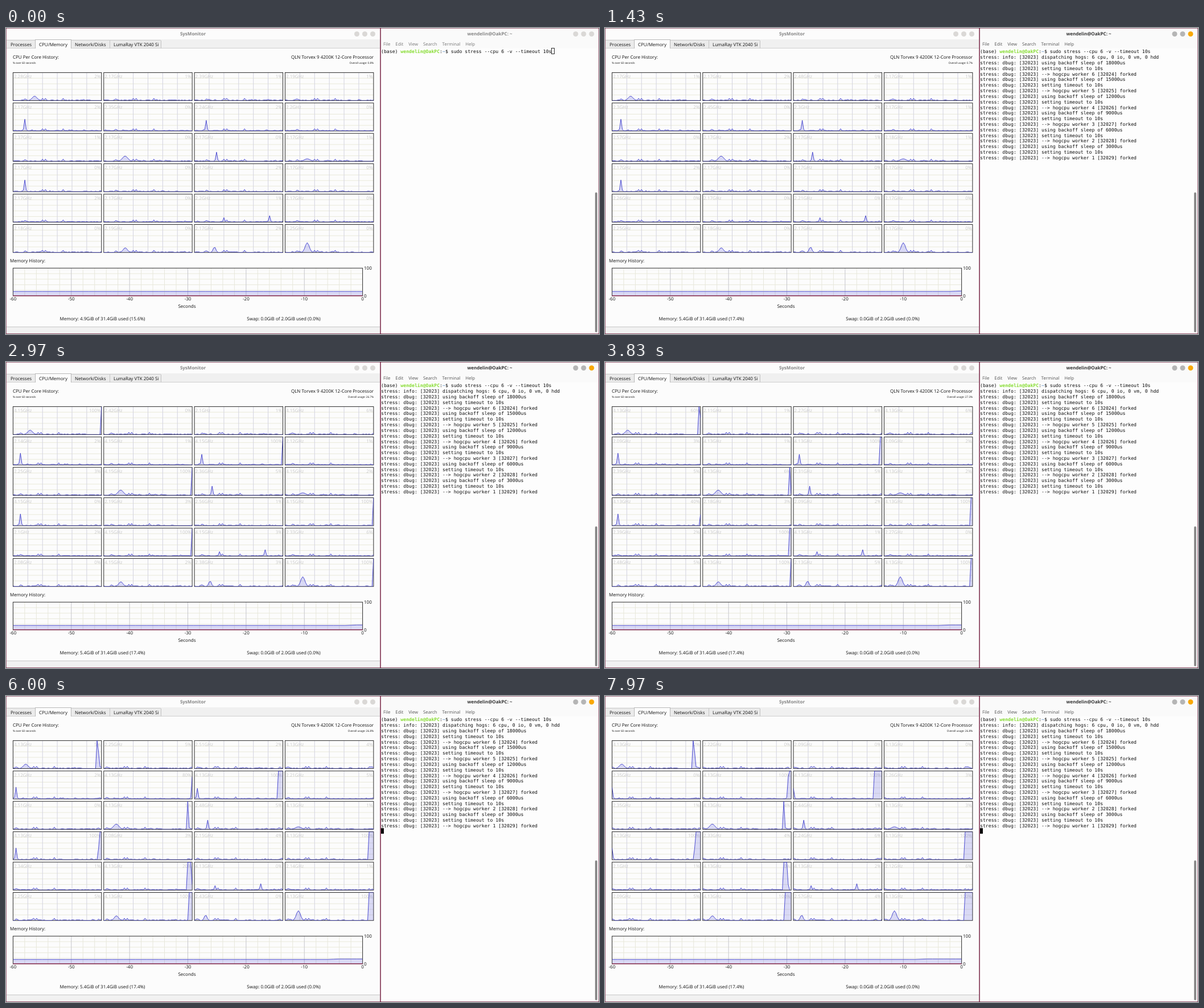
An HTML page with a canvas that plays this animation: 1042 by 538 pixels, repeating every 8 s.

```html
<!DOCTYPE html>
<html lang="en">
<head>
<meta charset="utf-8">
<title>SysMonitor</title>
<style>
html, body { margin: 0; width: 100%; height: 100%; overflow: hidden; background: #fcfcfc; }
canvas { display: block; width: 1042px; height: 538px; }
</style>
</head>
<body>
<canvas id="stage" width="1042" height="538"></canvas>
<script>
const ctx = document.getElementById('stage').getContext('2d');
const LOOP = 8000, FOCUS = 400, ENTER = 700, BLINK = 1200;
const TICK = 1000, CPU_PHASE = 45, MEM_PHASE = 200;
const CORES = 24, SPAN = 60, LAST = 8, START = 3;
const SANS = '"Open Sans", "Noto Sans", sans-serif';
const MONO = '"DejaVu Sans Mono", monospace';
const BLUE = '#3030c8', FILL = 'rgba(75,75,215,0.2)', MAROON = '#6b1234';
const LIGHT = '#dad8d6', GREY = '#b5b5b5', ORANGE = '#f9a806';
const USER = 'wendelin', HOST = 'OakPC';

const clamp = v => Math.max(0, Math.min(1, v));

function noise(a, b) {
  const v = Math.sin(a * 127.1 + b * 311.7) * 43758.5453;
  return v - Math.floor(v);
}

// Each worker's first core and the tick at which it hops to the sibling thread.
const hops = { 0: 3.6, 6: 99, 9: 3, 15: 99, 17: 5.2, 23: 99 };
const sibling = core => (core + CORES / 2) % CORES;

function load(core, n) {
  const r = noise(core + 5, n + 2);
  if (n < START) return Math.floor(3.2 * r * r);
  const idle = Math.floor(7 * r);
  const stay = c => clamp(hops[c] - n + 1);
  const busy = core in hops ? stay(core)
    : sibling(core) in hops ? 1 - stay(sibling(core)) : 0;
  return Math.round(Math.max(idle, 100 * busy));
}

function clock(core, n) {
  const r = noise(core + 9, n + 4);
  if (n < START) return 2.17 + 0.5 * r ** 8;
  const boosted = core in hops || sibling(core) in hops;
  return boosted ? (n === START ? 4.15 : 4.13) : 2.08 + 0.5 * r ** 2;
}

// Earlier activity: core, second, height, width
const bumps = [
  [0, 14.6, 16, 1.6], [4, 8, 42, 0.5], [6, 8, 38, 0.5], [12, 8, 42, 0.5],
  [9, 14.5, 19, 1.8], [10, 15, 33, 0.5], [11, 15, 9, 2], [18, 20, 16, 0.5],
  [18, 51, 23, 0.5], [21, 14.6, 17, 1.4], [22, 13.6, 20, 0.9], [23, 15, 35, 1.4]
];

function trace(core, i) {
  if (i > SPAN) return load(core, i - SPAN);
  const r = noise(core + 1, i);
  const rest = r < 0.55 ? 0.4 : r < 0.95 ? 2 : 4;
  const shared = [8.4, 20, 22, 34].map(at => [core, at, 8, 0.5]);
  return [...shared, ...bumps].reduce((top, [c, at, high, wide]) =>
    c === core ? Math.max(top, high * Math.exp(-(((i - at) / wide) ** 2) / 2)) : top, rest);
}

const times = Array.from({ length: SPAN + LAST + 1 }, (_, i) => i);
const cores = Array.from({ length: CORES }, (_, core) => times.map(i => trace(core, i)));
const memory = times.map(i => 15.6 + 0.877 * Math.max(0, Math.min(2, i - SPAN)));

const log = ['stress: info: [32023] dispatching hogs: 6 cpu, 0 io, 0 vm, 0 hdd'];
for (let i = 6; i > 0; i--) log.push(
  `stress: dbug: [32023] using backoff sleep of ${i * 3000}us`,
  'stress: dbug: [32023] setting timeout to 10s',
  `stress: dbug: [32023] --> hogcpu worker ${i} [${32030 - i}] forked`);

function rect(x, y, w, h, color) {
  ctx.fillStyle = color;
  ctx.fillRect(x, y, w, h);
}

function text(str, x, y, { size = 8, color = '#111', align = 'left', weight = 400 } = {}) {
  ctx.font = `${weight} ${size}px ${SANS}`;
  ctx.fillStyle = color;
  ctx.textAlign = align;
  ctx.fillText(str, x, y);
}

function line(x1, y1, x2, y2, color) {
  ctx.strokeStyle = color;
  ctx.lineWidth = 1;
  ctx.beginPath();
  ctx.moveTo(x1, y1);
  ctx.lineTo(x2, y2);
  ctx.stroke();
}

function frame(x, y, w, h) {
  ctx.strokeStyle = '#2c2c2c';
  ctx.lineWidth = 1;
  ctx.strokeRect(x, y, w, h);
}

function buttons(x, colors) {
  colors.forEach((color, i) => {
    ctx.fillStyle = color;
    ctx.beginPath();
    ctx.arc(x + i * 14, 10.5, 4.5, 0, 7);
    ctx.fill();
  });
}

function grid(x, y, w, h, cols, major, strong) {
  for (let i = 1; i < 5; i++) line(x, y + h * i / 5, x + w, y + h * i / 5, '#e9e9da');
  for (let i = 1; i < cols; i++)
    line(x + w * i / cols, y, x + w * i / cols, y + h, i % major ? '#e7e7dc' : strong);
}

function plot(data, shift, x, y, w, h) {
  ctx.save();
  ctx.beginPath();
  ctx.rect(x, y, w, h);
  ctx.clip();
  ctx.beginPath();
  for (let i = 0; i <= SPAN; i++)
    ctx.lineTo(x + i * w / SPAN, y + h - data[i + shift] / 100 * h);
  ctx.strokeStyle = BLUE;
  ctx.lineWidth = 0.85;
  ctx.lineJoin = 'round';
  ctx.stroke();
  ctx.lineTo(x + w, y + h);
  ctx.lineTo(x, y + h);
  ctx.fillStyle = FILL;
  ctx.fill();
  ctx.restore();
}

function drawTabs() {
  rect(1, 20, 656, 16, '#f0f0f0');
  rect(1, 22, 271, 14, '#ebebeb');
  line(1, 35.5, 657, 35.5, '#cfcfcf');
  for (const x of [182.5, 272.5]) line(x, 22, x, 36, '#c4c4c4');
  line(1, 21.5, 272, 21.5, '#cccccc');
  rect(51, 20, 64, 16, '#fcfcfc');
  for (const x of [51.5, 114.5]) line(x, 20, x, 36, '#b8b8b8');
  line(51, 20.5, 115, 20.5, '#b8b8b8');
  text('Processes', 8, 31.5);
  text('CPU/Memory', 58, 31.5);
  text('Network/Disks', 121, 31.5);
  text('LumaRay VTK 2040 Si', 189, 31.5);
}

function drawCores(n) {
  const w = 155.4, h = 49.2, faint = { color: '#c9c9c9' };
  const total = cores.reduce((sum, _, core) => sum + load(core, n), 0);
  text('CPU Per Core History:', 12, 53.5);
  text('% over 60 seconds', 12, 63.3, { size: 4.7 });
  text('QLN Torvex 9 4200K 12-Core Processor', 646, 53.5, { align: 'right' });
  text(`Overall usage: ${(total / CORES).toFixed(1)}%`, 646, 63.3, { size: 4.7, align: 'right' });
  cores.forEach((data, core) => {
    const x = 12.4 + core % 4 * 159.35;
    const y = 78.4 + Math.floor(core / 4) * 53.42;
    grid(x, y, w, h, 6, 1, '#d3d3df');
    text(Number(clock(core, n).toFixed(2)) + 'GHz', x + 1.5, y + 9.8, faint);
    text(load(core, n) + '%', x + w - 1.5, y + 9.8, { ...faint, align: 'right' });
    frame(x, y, w, h);
    plot(data, n, x, y, w, h);
  });
}

function drawMemory(m) {
  const x = 12.4, y = 422.2, w = 614.2, h = 48.6;
  const percent = memory[SPAN + m];
  const gib = (percent * 0.314).toFixed(1);
  text('Memory History:', 7, 411.5);
  grid(x, y, w, h, 30, 5, '#c6c6cc');
  frame(x, y, w, h);
  plot(memory, m, x, y, w, h);
  line(x, y + h, x + w, y + h, '#981040');
  for (let i = 0; i < 7; i++)
    text(String(i * 10 - 60), x + w * i / 6, 479, { align: 'center' });
  text('100', 629, 425.3);
  text('0', 629, 474.3);
  text('Seconds', 318, 492, { align: 'center' });
  text(`Memory: ${gib}GiB of 31.4GiB used (${percent.toFixed(1)}%)`, 169.5, 514, { align: 'center' });
  text('Swap: 0.0GiB of 2.0GiB used (0.0%)', 488, 514, { align: 'center' });
}

function drawMonitor(t) {
  const ticks = phase => Math.floor((t - phase) / TICK) + 1;
  rect(0.6, 0.6, 656.7, 536.7, '#fcfcfc');
  text('SysMonitor', 328.5, 13.3, { color: '#858585', align: 'center', weight: 700 });
  buttons(616.5, [LIGHT, LIGHT, LIGHT]);
  drawTabs();
  drawCores(ticks(CPU_PHASE));
  drawMemory(ticks(MEM_PHASE));
  rect(1, 526, 656, 11, '#f1f1f1');
  line(1, 525.5, 657, 525.5, '#c8c8c8');
}

const CELL = 4.91, ROW = 9.82, LEFT = 659, TOP = 36.6;

function cells(str, col, row, color = '#0c0c0c', weight = 400) {
  ctx.font = `${weight} 8.15px ${MONO}`;
  ctx.fillStyle = color;
  ctx.textAlign = 'left';
  [...str].forEach((c, i) =>
    ctx.fillText(c, LEFT + (col + i) * CELL, TOP + 7.7 + row * ROW));
}

function drawMenu(color) {
  let x = 663;
  for (const item of ['File', 'Edit', 'View', 'Search', 'Terminal', 'Help']) {
    text(item, x, 31, { size: 7.8, color });
    x += ctx.measureText(item).width + 9;
  }
}

function drawTerminal(t) {
  const active = t >= FOCUS, done = t >= ENTER;
  const name = `${USER}@${HOST}`;
  rect(658.7, 0.6, 382.7, 536.7, '#fdfdfd');
  rect(659, 1, 382, 35, '#fafafa');
  text(`${name}: ~`, 850, 13.3,
    { color: active ? '#333' : '#858585', align: 'center', weight: 700 });
  buttons(1001, active ? [GREY, GREY, ORANGE] : [LIGHT, LIGHT, LIGHT]);
  drawMenu(active ? '#555' : '#777');

  cells('(base) ', 0, 0);
  cells(name, 7, 0, '#86dc30', 700);
  cells(':', 21, 0);
  cells('~', 22, 0, '#729fcf', 700);
  cells('$ sudo stress --cpu 6 -v --timeout 10s', 23, 0);
  if (done) log.forEach((str, i) => cells(str, 0, i + 1));

  const x = done ? LEFT : LEFT + 61 * CELL;
  const y = TOP - 0.7 + (done ? 20 * ROW : 0);
  if (!active) frame(Math.round(x) - 0.5, Math.round(y) - 0.5, 5, 10);
  else if (!done || (t - ENTER) % BLINK < BLINK / 2) rect(x, y, CELL, ROW, '#000');

  ctx.fillStyle = '#8c8c8c';
  ctx.beginPath();
  ctx.roundRect(1035, 289, 4, 246, 2);
  ctx.fill();
}

function draw() {
  const t = performance.now() % LOOP;
  ctx.textBaseline = 'alphabetic';
  ctx.textRendering = 'geometricPrecision';
  rect(0, 0, 1042, 538, MAROON);
  drawMonitor(t);
  drawTerminal(t);
  requestAnimationFrame(draw);
}
draw();
</script>
</body>
</html>
```
